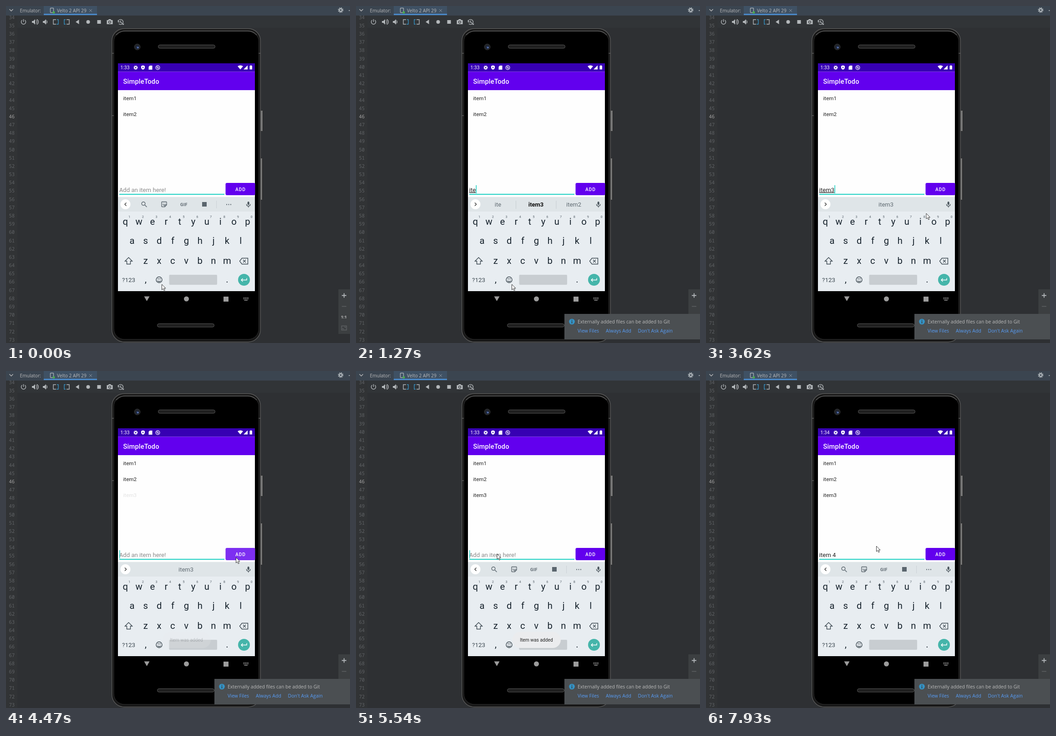
An HTML page that plays this animation: 756x741 px, repeating every 8000 ms.

```html
<!DOCTYPE html>
<html lang="en">
<head>
<meta charset="utf-8">
<title>Todo app in emulator</title>
<style>
  html, body { margin: 0; width: 100%; height: 100%; overflow: hidden; background: #2e3033; }
  svg { display: block; }
  text { white-space: pre; }
  .ide { font-family: "Open Sans", "Noto Sans", sans-serif; fill: #bbb; }
  .app { font-family: Roboto, sans-serif; }
  .mono { font: 10.5px "Noto Sans Mono", monospace; fill: #606366; }
  .mid { text-anchor: middle; }
  .line { fill: none; stroke-width: 1.4; }
</style>
</head>
<body>
<svg id="stage" width="756" height="741" viewBox="0 0 756 741">
  <!-- editor and emulator window -->
  <rect width="756" height="741" fill="#2e3033"/>
  <rect width="25" height="741" fill="#313335"/>
  <g id="lines" class="mono"></g>
  <rect x="25" y="20" width="731" height="28" fill="#313437"/>
  <rect width="756" height="21" fill="#3b4550"/>
  <rect x="83" width="117" height="20" fill="#3f5164"/>
  <rect x="83" y="17" width="117" height="3" fill="#4a88c7"/>
  <path d="M7.500 7l4 4 4-4" class="line" stroke="#bbb"/>
  <g class="ide" font-size="10.2">
    <text x="30.500" y="13.500">Emulator:</text>
    <text x="112" y="13.500">Velto 2 API 29</text>
  </g>
  <g class="line" stroke="#a9b0b5">
    <rect x="97.500" y="4.500" width="7" height="10" rx="1"/>
    <path d="M183 7l6 6m0-6l-6 6" stroke="#87919a" stroke-width="1"/>
    <path d="M753 10h3"/>
    <circle cx="735.500" cy="9" r="3" stroke-width="2.400"/>
    <circle cx="735.500" cy="9" r="5" stroke-width="2" stroke-dasharray="2.200 1.730"/>
  </g>
  <circle cx="105" cy="14" r="2.500" fill="#4cae50"/>

  <!-- emulator toolbar -->
  <g class="line" stroke="#b4b8bb">
    <path d="M38.500 29v6M35.500 31a5 5 0 1 0 6 0M66 31.500a4 4 0 0 1 0 7m1.500-9a6 6 0 0 1 0 11M89 32a4 4 0 0 1 0 6"/>
    <path d="M110 30h-6v10h6M133 30h6v10h-6M246.500 31v4h4m-4-1a5.500 5.500 0 1 1 1.500 5M252 32v4l3 1.500"/>
    <path d="M112 30h3v10h-4M131 30h-3v10h3" stroke="#3592c4"/>
  </g>
  <g fill="#b4b8bb">
    <path d="M57 33h3l4-4v12l-4-4h-3zM81 33h3l4-4v12l-4-4h-3zM160.500 30v10l-7.500-5z"/>
    <circle cx="180.500" cy="35" r="4"/>
    <rect x="200.500" y="31" width="8" height="8"/>
    <path d="M221.500 31h3l1.500-2h4l1.500 2h3v9h-13z"/>
    <circle cx="228" cy="35.300" r="2.500" fill="none" stroke="#313437" stroke-width="1.300"/>
    <path d="M255 39h5l-2.500 3z"/>
  </g>

  <!-- zoom controls -->
  <rect x="730.500" y="623" width="26" height="98" fill="#3c3f41"/>
  <path d="M738 636.500h10m-5-5v10" stroke="#b4b8bb" stroke-width="1.800"/>
  <path d="M738 660.500h10" stroke="#5e6163" stroke-width="1.500"/>
  <text x="742.500" y="687" class="ide mid" font-size="9" font-weight="700">1:1</text>
  <path d="M737.500 703.500h11v9h-11zM740 710v-2m0 2h2m4-4v2m0-2h-2" class="line" stroke="#5e6163" stroke-width="1"/>

  <!-- phone body -->
  <g fill="#777" stroke="#222">
    <rect x="559.500" y="229.500" width="5" height="46" rx="1"/>
    <rect x="559.500" y="334.500" width="4" height="92" rx="1"/>
  </g>
  <rect x="232.700" y="49.700" width="326.600" height="689" rx="27" fill="#181818" stroke="#5a5a5a" stroke-width="1.400"/>
  <rect x="237" y="55" width="318.500" height="678" rx="23" stroke="#303030"/>
  <path d="M242 64q8-9 20-9h269q12 0 20 9" class="line" stroke="#626262" stroke-width="1"/>
  <path d="M233 104h4m-4 137h4m318-137h4" stroke="#777"/>
  <circle cx="288.500" cy="90" r="6.500" fill="#202329" stroke="#363636"/>
  <circle cx="289" cy="91" r="3" fill="#24365d"/>
  <circle cx="290" cy="91.500" r="1.200" fill="#8ba4e8"/>
  <g fill="#1f1f1f" stroke="#555">
    <rect x="334.500" y="85.500" width="125" height="7.500" rx="3.700"/>
    <rect x="332.500" y="698.500" width="125" height="7.500" rx="3.700"/>
  </g>

  <!-- app screen -->
  <rect x="246" y="126" width="301" height="501" fill="#fefefe"/>
  <rect x="246" y="126" width="301" height="18.500" fill="#3700b3"/>
  <rect x="246" y="144.500" width="301" height="40.500" fill="#6200ee"/>
  <g class="app" fill="#fff">
    <text id="clock" x="251.500" y="139" font-size="10.400"></text>
    <text x="257.500" y="170.500" font-size="14.650" font-weight="500" letter-spacing=".18">SimpleTodo</text>
    <path d="M301 130.500l4 1.500v3q0 4-4 5-4-1-4-5v-3zM316 131h5.500v9h-8v-6.500zM509 132.500q6-4 12 0l-6 7zM531 130.500v9h-9zM535.500 131.500h1.500v-1h2.500v1h1.500v8h-5.500z"/>
    <circle cx="301" cy="135" r="1.300" fill="#3700b3"/>
  </g>
  <g class="line" stroke="#fff">
    <circle cx="285" cy="135.500" r="2.500" stroke-width="2"/>
    <circle cx="285" cy="135.500" r="4" stroke-dasharray="1.600 1.540"/>
    <circle cx="333.500" cy="135.500" r="4.400" stroke-width="1.200"/>
    <circle cx="333.500" cy="135.500" r="1.800" stroke-width="1"/>
    <path d="M330.500 132.500l6 6" stroke-width="1"/>
  </g>
  <g class="app" font-size="11.700" fill="#222">
    <text x="257.500" y="207">item1</text>
    <text x="257.500" y="242.200">item2</text>
    <text id="added" x="257.500" y="277.400">item3</text>
  </g>
  <rect x="249" y="413" width="231" height="2" fill="#1fd0c4"/>
  <text id="field" class="app" x="248.700" y="408.600" font-size="13.180"></text>
  <rect id="caret" y="394" width="1.500" height="18" fill="#16cfc2"/>
  <rect id="button" x="482.500" y="389" width="65" height="27" rx="3"/>
  <text x="515.400" y="406.500" class="app mid" font-size="10.250" font-weight="500" letter-spacing=".91" fill="#fff">ADD</text>

  <!-- keyboard -->
  <rect x="246" y="420" width="301" height="207" fill="#e8edf1"/>
  <rect x="246" y="420" width="301" height="32" fill="#dfe5e8"/>
  <circle cx="262.500" cy="436" r="11" fill="#fff"/>
  <path id="chevron" class="line" stroke="#333"/>
  <g id="icons" class="line" stroke="#5a656d">
    <circle cx="302" cy="434.500" r="3.800"/>
    <path d="M305 437.500l4.500 4.500"/>
    <path d="M342 431.500q0-1 1-1h9q1 0 1 1v6l-4 4h-6q-1 0-1-1zM349 441v-4h4M344.500 436q2 3 4 1M345 433.500h1m3 0h1"/>
    <rect x="431" y="431" width="10" height="10" fill="#5a656d" stroke="none"/>
    <path d="M462.500 428v17" stroke="#cbd2d6" stroke-width="1"/>
    <path d="M484 436.500h2m2.500 0h2m2.500 0h2" stroke-width="2.200"/>
    <text x="391" y="439.800" class="app mid" font-size="9.500" font-weight="700" letter-spacing=".5" fill="#5a656d" stroke="none">GIF</text>
  </g>
  <g id="words" class="app mid" font-size="13" fill="#606b72">
    <path id="dividers" d="M351.500 428v18M440 428v18" stroke="#c6cdd1"/>
    <text x="312" y="441"></text>
    <text x="395.500" y="441"></text>
    <text x="478.500" y="441"></text>
  </g>
  <rect x="530.700" y="430" width="4" height="7.500" rx="2" fill="#4a555d"/>
  <path d="M528.500 435.500q0 4.500 4.200 4.500t4.200-4.500M532.700 440v3" class="line" stroke="#4a555d" stroke-width="1.200"/>
  <g id="keys" class="app mid" font-size="20.300" fill="#16222c"></g>
  <g class="line" stroke="#3c4850">
    <path d="M269.500 553l8 8h-4v6.500h-8v-6.500h-4zM518.500 554.500h13v13h-13l-5-6.500zM521 558l6 6m0-6l-6 6"/>
    <circle cx="336.500" cy="602" r="6.500"/>
    <path d="M333 604q3.500 4 7 0"/>
    <path d="M333.500 600h2m2 0h2" stroke-width="2"/>
  </g>
  <rect x="358.500" y="591" width="105.500" height="22" rx="2" fill="#c8cdd1"/>
  <circle cx="523" cy="602" r="13" fill="#45b5aa"/>
  <path d="M529 598.500v4h-12m3.500-3.500l-3.500 3.500 3.500 3.500" class="line" stroke="#fff" stroke-width="1.700"/>
  <g id="toast">
    <rect x="343.500" y="573.500" width="106.500" height="35.500" rx="17.700" fill="#ebecee"/>
    <text x="396.500" y="595" class="app mid" font-size="10.250" fill="#222">Item was added</text>
  </g>

  <!-- navigation bar -->
  <g fill="#9c9c9c">
    <path d="M303.500 638.500h12l-6 10.500z"/>
    <circle cx="396.500" cy="644" r="5.500"/>
    <rect x="478" y="639" width="11" height="11"/>
  </g>
  <path d="M521.500 641.500h11.500m-11.500 2.500h11.500" stroke="#aaa" stroke-width="1.400" stroke-dasharray="1.500 1"/>
  <path d="M523.500 647h7.500" stroke="#aaa" stroke-width="1.400"/>

  <g id="notice" class="ide" font-size="10.500">
    <rect x="458" y="677" width="298" height="56" fill="#4b4f52"/>
    <circle cx="474.500" cy="694" r="6.300" fill="#3592c4"/>
    <path d="M474.500 690v1.700m0 1.300v5" stroke="#3b3e40" stroke-width="1.600"/>
    <text x="487" y="698">Externally added files can be added to Git</text>
    <g fill="#589df6">
      <text x="487" y="717.500">View Files</text>
      <text x="549" y="717.500">Always Add</text>
      <text x="619.500" y="717.500">Don't Ask Again</text>
    </g>
  </g>
  <path id="mouse" d="M.500 0v12l2.800-2.500 2 4.300 2-.9-2-4.200h3.700z" fill="#fff" stroke="#222" stroke-width=".9"/>
</svg>
<script>
const $ = id => document.getElementById(id);
const DURATION = 8000;

let numbers = '';
for (let n = 34; n <= 73; n++) {
  const color = n === 46 ? ' style="fill:#a4a3a3"' : '';
  numbers += `<text x="6.500" y="${28.700 + (n - 34) * 18.180}"${color}>${n}</text>`;
}
$('lines').innerHTML = numbers;

const key = (label, x, y, extra = '') => `<text x="${x}" y="${y}" ${extra}>${label}</text>`;
const row = (letters, x, y) => [...letters].map((c, i) => key(c, x + i * 29.850, y)).join('');
$('keys').innerHTML =
  row('qwertyuiop', 262.300, 480.500) + row('asdfghjkl', 277, 523) + row('zxcvbnm', 306.700, 566.500) +
  [...'1234567890'].map((d, i) => key(d, 271 + i * 29.850, 465.500, 'font-size="7.500" fill="#56616a"')).join('') +
  key('?123', 269.500, 607, 'font-size="13.400" fill="#3c4850"') + key(',', 307, 608) + key('.', 486, 608);

// Each track holds [start time, value] steps.
const tracks = {
  text: [[0, ''], [990, 'i'], [1140, 'it'], [1270, 'ite'], [1420, 'item'], [2600, 'item3'], [4340, ''],
    [6190, 'i'], [6310, 'it'], [6450, 'ite'], [6690, 'item'], [7270, 'item '], [7390, 'item 4']],
  caret: [[0, 0], [370, 1], [870, 0], [990, 1], [1920, 0], [2450, 1], [3100, 0], [3620, 1], [4100, 0],
    [4340, 1], [4910, 0], [5390, 1], [5820, 0], [6190, 1], [7930, 0]],
  words: [[0, ''], [990, 'i|item3|item2'], [1140, 'it|item3|item2'], [1270, 'ite|item3|item2'],
    [1420, 'item3|item|item2'], [2600, '|item3|'], [4630, ''], [6190, 'i|item3|item2'],
    [6310, 'it|item3|item2'], [6450, 'ite|item3|item2'], [6690, 'item3|item|item2'],
    [7270, 'is|and|for'], [7390, '|4|'], [7540, '']],
  mouse: [[0, '342,612'], [3380, '362,584'], [3500, '432,504'], [3620, '483.500,456'], [3740, '500,432'],
    [3860, '510,415'], [3980, '507,411'], [4100, '505,410'], [4630, '421,436'], [4770, '345,426'],
    [4910, '326,414'], [5030, '315,406'], [5150, '309.500,402'], [7800, '335,398'], [7930, '374,385']],
  toast: [[0, 0], [4470, .2], [4630, .6], [4770, .9], [4910, 1], [6450, .75], [6570, .5], [6690, .2], [6810, 0]],
  added: [[0, 0], [4470, .12], [4630, 1]],
  button: [[0, '#6200ee'], [4220, '#6a0fef'], [4340, '#7420f0'], [4470, '#7d2ff1'], [4630, '#6200ee']],
  clock: [[0, '1:33'], [7930, '1:34']],
  notice: [[0, 0], [250, .6], [370, 1]],
};
const valueAt = (name, t) => tracks[name].findLast(step => step[0] <= t)[1];
const wordLabels = $('words').querySelectorAll('text');

function draw(t) {
  const text = valueAt('text', t);
  const composing = text && !text.includes(' ');
  const field = $('field');
  field.textContent = text || 'Add an item here!';
  field.setAttribute('fill', text ? '#222' : '#8b8b8b');
  field.setAttribute('text-decoration', composing ? 'underline' : 'none');
  $('caret').setAttribute('x', 249 + (text ? field.getComputedTextLength() : 0));

  const words = valueAt('words', t);
  const labels = words.split('|');
  wordLabels.forEach((label, i) => label.textContent = labels[i] || '');
  const bold = composing && labels[0];
  wordLabels[1].setAttribute('font-weight', bold ? 700 : 400);
  wordLabels[1].setAttribute('fill', bold ? '#111' : '#606b72');
  $('dividers').style.opacity = labels[0] ? 1 : 0;
  $('words').style.opacity = words ? 1 : 0;
  $('icons').style.opacity = words ? 0 : 1;
  $('chevron').setAttribute('d', words ? 'M261 432.500l3.500 3.500-3.500 3.500' : 'M264.500 432.500l-3.500 3.500 3.500 3.500');

  for (const id of ['caret', 'toast', 'added', 'notice']) $(id).style.opacity = valueAt(id, t);
  $('button').setAttribute('fill', valueAt('button', t));
  $('clock').textContent = valueAt('clock', t);
  $('mouse').setAttribute('transform', `translate(${valueAt('mouse', t)})`);
}

function loop() {
  draw(performance.now() % DURATION);
  requestAnimationFrame(loop);
}
loop();
</script>
</body>
</html>
```
